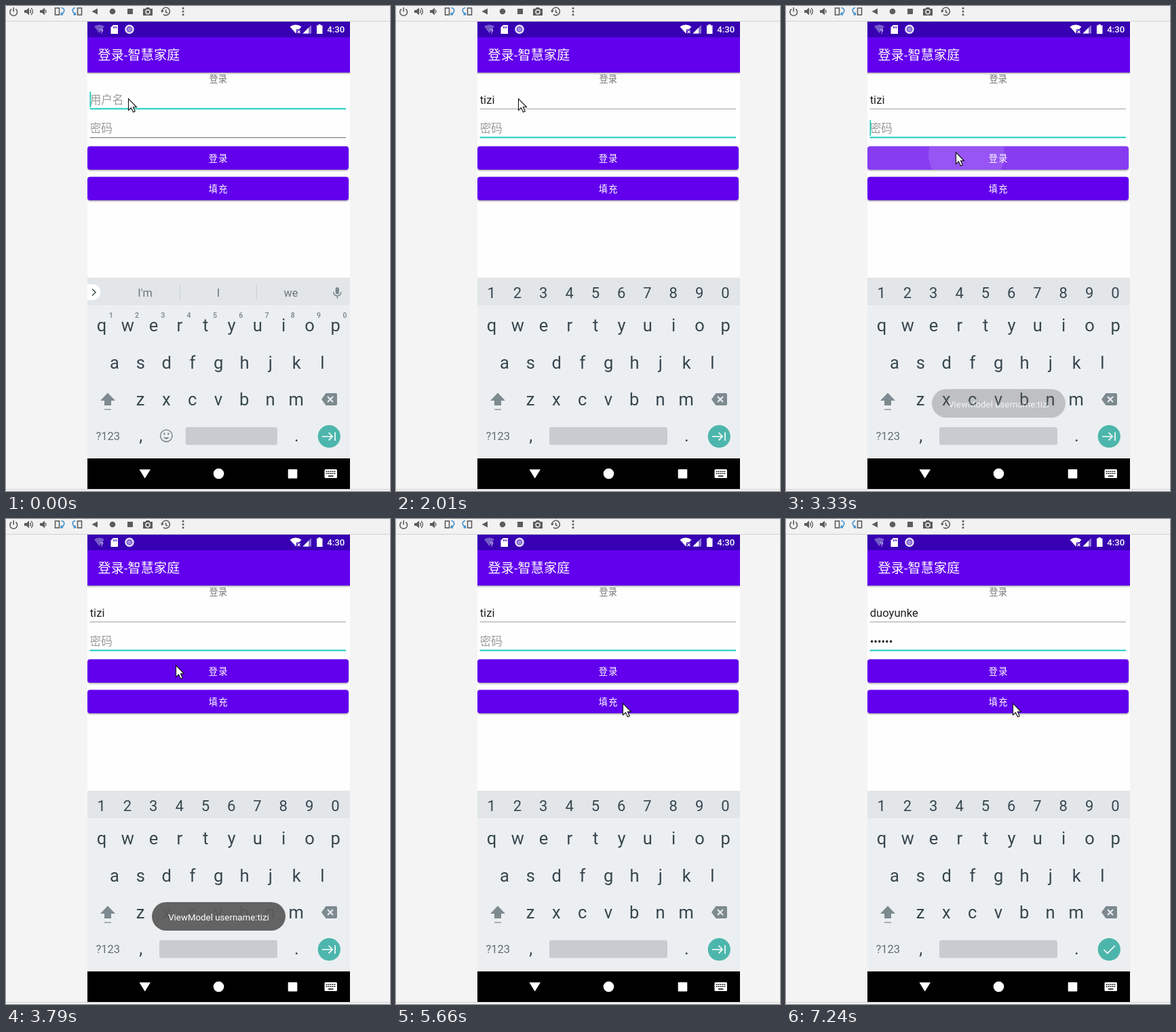
Animation of 566x714 px, one loop 7.32 s. Source, as an HTML page:

```html
<!DOCTYPE html>
<html lang="zh">
<head>
<meta charset="utf-8">
<title>登录</title>
<style>
html, body { margin: 0; width: 100%; height: 100%; overflow: hidden; background: #f4f4f4; }
svg { display: block; width: 566px; height: 714px; }
text { font-family: Roboto, "Noto Sans CJK SC", "Noto Sans CJK", sans-serif; }
.mid { text-anchor: middle; }
.field { font-size: 16.6px; fill: #212121; }
.hint { fill: #9b9b9b; }
.button { font-size: 13.2px; font-weight: 500; letter-spacing: 1.2px; fill: #fff; }
.word { font-size: 16.3px; fill: #69757b; }
.digit { font-size: 22px; fill: #37474f; }
.key { font-size: 25.5px; fill: #37474f; }
.corner { font-size: 10.5px; font-weight: 500; fill: #75828a; }
.grey { fill: #7d8a90; }
.line { fill: none; stroke-width: 1.6; }
</style>
</head>
<body>
<svg viewBox="0 0 566 714" xmlns="http://www.w3.org/2000/svg">
  <defs>
    <clipPath id="clip1"><rect x="120" y="206.5" width="385" height="34.5" rx="4"/></clipPath>
    <clipPath id="clip2"><rect x="120" y="251.5" width="385" height="34.5" rx="4"/></clipPath>
    <clipPath id="screen"><rect x="120" y="23" width="387" height="688"/></clipPath>
    <filter id="shadow" x="-5%" y="-20%" width="110%" height="150%">
      <feDropShadow dx="0" dy="1.3" stdDeviation="1.1" flood-opacity=".38"/>
    </filter>
  </defs>
  <rect width="566" height="714" fill="#f4f4f4"/>
  <rect width="566" height="22" fill="#f2f2f2"/>
  <path d="M0 22.5H566M0 711.5H566" stroke="#d0d0d0"/>

  <!-- emulator tools -->
  <g class="line" stroke="#5c5c5c">
    <path d="M8 4.5A5.4 5.4 0 1 0 14.400 4.500M11.200 2V8.500"/>
    <path d="M35.500 5.500Q37.500 8 35.500 10.500M37 3Q42 8 37 13" stroke-width="1.300"/>
    <path d="M58 5.500Q60 8 58 10.500" stroke-width="1.300"/>
    <rect x="72.500" y="3" width="6" height="10"/>
    <rect x="105.500" y="3" width="6" height="10"/>
    <path d="M230 8.500A5.700 5.700 0 1 1 232 12.300M235.500 5.500V8.800L238 10.200"/>
    <path d="M81.500 2.500Q87 4 85.500 8Q84.500 11 81.500 12.500M84 13L81 12.500 82 9.500M102 2.500Q97 4 98.500 8Q99.500 11 102.500 12.500M99.500 13L102.500 12.500 101.500 9.500" stroke="#3b8fcc"/>
  </g>
  <g fill="#5c5c5c">
    <path d="M27 6H30L34 2.500V13.500L30 10H27ZM50 6H53L57 2.500V13.500L53 10H50ZM135 3.500V12.500L126.500 8ZM179 4H187V12H179ZM202 4H205.500L207 2H211L212.500 4H216V14H202ZM228 6.500H233L230 10Z"/>
    <circle cx="157" cy="8" r="4.300"/>
    <circle cx="209" cy="8.800" r="3" fill="none" stroke="#f2f2f2" stroke-width="1.400"/>
    <circle cx="261" cy="3.300" r="1.500"/><circle cx="261" cy="8" r="1.500"/><circle cx="261" cy="12.700" r="1.500"/>
  </g>

  <!-- app screen -->
  <g clip-path="url(#screen)">
    <rect x="120" y="23" width="387" height="688" fill="#fefefe"/>
    <rect x="110" y="46" width="407" height="52" fill="#6200ee" filter="url(#shadow)"/>
  </g>
  <rect x="120" y="23" width="387" height="23" fill="#3700b3"/>
  <path d="M130 30Q137.500 25 145 30L137.500 40Z" fill="#765bca"/>
  <text x="139" y="41" font-size="9" font-weight="700" fill="#d8cdf2">?</text>
  <path d="M158 28H165V41H154.500V31.500Z" fill="#fff"/>
  <path d="M158.500 30V33M160.700 30V33M162.900 30V33" stroke="#3700b3"/>
  <circle cx="182" cy="34.300" r="6.700" fill="#e9e2f8"/>
  <circle cx="182" cy="34.300" r="3.700" fill="#a18be0" stroke="#6a45c8" stroke-width="1.200"/>
  <path d="M418.500 30.500Q427 24.500 435.500 30.500L432 34.500H428V39L427 40.300Z" fill="#fff"/>
  <path d="M429.500 36L433.500 40M433.500 36L429.500 40" stroke="#fff" stroke-width="1.200"/>
  <path d="M450 28V40.500H437.500Z" fill="#8f76d3"/>
  <path d="M446 32V40.500H437.500Z" fill="#fff"/>
  <path d="M458 28.500H460.500V27H463.700V28.500H466.500V41H458Z" fill="#fff"/>
  <text x="473.300" y="39" font-size="13.200" font-weight="500" fill="#fff">4:30</text>
  <text x="135.500" y="79.300" font-size="19" letter-spacing=".25" fill="#fff">登录-智慧家庭</text>
  <text class="mid" x="312.700" y="112" font-size="13.200" fill="#757575">登录</text>

  <text class="field" id="name" x="123.700" y="144"></text>
  <text class="field" id="secret" x="123.700" y="186.300"></text>
  <rect id="nameLine" x="123.500" width="377.500"/>
  <rect id="secretLine" x="123.500" width="377.500"/>
  <rect id="caret" width="1.700" height="23" fill="#16c9b6"/>

  <g clip-path="url(#screen)">
    <g fill="#6200ee" filter="url(#shadow)">
      <rect x="120" y="206.500" width="385" height="34.500" rx="4"/>
      <rect x="120" y="251.500" width="385" height="34.500" rx="4"/>
    </g>
  </g>
  <g clip-path="url(#clip1)" fill="#fff">
    <rect id="glow1" x="120" y="206" width="385" height="36"/><circle id="spot1"/>
  </g>
  <g clip-path="url(#clip2)" fill="#fff">
    <rect id="glow2" x="120" y="251" width="385" height="36"/><circle id="spot2"/>
  </g>
  <text class="button mid" x="313.200" y="228.500">登录</text>
  <text class="button mid" x="313.200" y="273.700">填充</text>

  <!-- keyboard -->
  <rect x="120" y="400" width="387" height="266" fill="#eceff1"/>
  <rect x="120" y="400" width="387" height="41.500" fill="#e2e6e9"/>
  <path d="M120 441.500H507" stroke="#f3f5f6"/>
  <g id="suggestions">
    <path d="M120 409.500H127.500A11.700 11.700 0 0 1 127.500 433H120Z" fill="#fff"/>
    <path class="line" d="M127 416.500L132 421.500 127 426.500" stroke="#4a555a" stroke-width="1.900"/>
    <path d="M256.500 410V432.500M369.500 410V432.500" stroke="#c9cfd3"/>
    <rect x="485.700" y="414" width="5.200" height="10" rx="2.600" class="grey"/>
    <path class="line" d="M482.800 421Q483 426.500 488.300 426.500T493.800 421M488.300 426.500V430.500" stroke="#7d8a90"/>
  </g>
  <g id="digits"></g>
  <g id="keys"></g>
  <path class="grey" d="M150 569.500L161 581H155V588H145V581H139Z"/>
  <path d="M145 594H155" stroke="#7d8a90" stroke-width="1.300"/>
  <path class="grey" d="M471.500 570H486Q488 570 488 572V586Q488 588 486 588H471.500L465 579Z"/>
  <path d="M474 575L482 583M482 575L474 583" stroke="#eceff1" stroke-width="2"/>
  <text class="mid" x="150.300" y="639" font-size="16.500" fill="#626f75">?123</text>
  <g id="emoji" class="line" stroke="#7d8a90">
    <circle cx="236.300" cy="632.700" r="8.700"/>
    <path d="M231.800 635Q236.300 640.500 240.800 635Z" fill="#7d8a90" stroke="none"/>
    <path d="M233.300 628.500V631.300M239.300 628.500V631.300" stroke-width="2.200"/>
  </g>
  <rect id="space" y="620" height="26.300" rx="3" fill="#c8ccd0"/>
  <circle cx="476.300" cy="633.700" r="16.600" fill="#4db6ac"/>
  <path id="next" class="line" d="M466 633.700H481M475.500 628L481.200 633.700 475.500 639.400M485 627.500V640" stroke="#fff" stroke-width="1.900"/>
  <path id="done" class="line" d="M468.500 634L473.800 639.300 485 628" stroke="#fff" stroke-width="1.900"/>

  <!-- navigation -->
  <rect x="120" y="666" width="387" height="45" fill="#000"/>
  <path d="M196.500 682.300H213L204.700 695.500Z" fill="#fff"/>
  <circle cx="313.500" cy="688.500" r="7.800" fill="#fff"/>
  <rect x="415.700" y="682" width="13.600" height="13.600" rx="1" fill="#fff"/>
  <rect x="469.500" y="682" width="18.500" height="13" rx="1.500" fill="#fff"/>
  <path d="M472 685.300H486M472 688.300H486" stroke="#000" stroke-width="1.600" stroke-dasharray="1.700 1.200"/>
  <path d="M475 692H482.500" stroke="#000" stroke-width="1.500"/>

  <g id="toast">
    <rect x="215" y="564" width="197" height="42" rx="21" fill="#5b5b5b" fill-opacity=".94"/>
    <text class="mid" x="313.500" y="590.500" font-size="13.300" fill="#fff">ViewModel username:tizi</text>
  </g>
  <path id="pointer" d="M0 0V17L4 13.300 7 19.700 9.700 18.500 6.900 12.300H12Z" fill="#fff" stroke="#111" stroke-width="1.100"/>
</svg>
<script>
const LOOP = 7320;
const $ = id => document.getElementById(id);
const set = (id, attrs) => { for (const k in attrs) $(id).setAttribute(k, attrs[k]); };
const show = (id, on) => { $(id).style.display = on ? '' : 'none'; };

function addText(parent, cls, x, y, content) {
  const el = document.createElementNS('http://www.w3.org/2000/svg', 'text');
  el.setAttribute('class', cls + ' mid');
  el.setAttribute('x', x);
  el.setAttribute('y', y);
  el.textContent = content;
  $(parent).append(el);
  return el;
}

const PITCH = 38.3;
const row = (parent, cls, chars, x, y) =>
  [...chars].map((c, i) => addText(parent, cls, x + i * PITCH, y, c));
row('keys', 'key', 'qwertyuiop', 141, 479.3);
row('keys', 'key', 'asdfghjkl', 160, 533.7);
row('keys', 'key', 'zxcvbnm', 198, 588);
row('keys', 'key', ',', 198.7, 640.5);
row('keys', 'key', '.', 428.3, 640.5);
row('digits', 'digit', '1234567890', 140.7, 430);
const corners = row('keys', 'corner', '1234567890', 154.7, 458.5);
const words = [205, 313, 420].map(x => addText('suggestions', 'word', x, 427.7, ''));

const ticks = [
  [0, 0, 1], [460, 460, 1], [630, 780, 3], [1080, 1160, 2], [1540, 1640, 2], [2010, 2010, 1],
  [2570, 3250, 10], [3330, 3330, 1], [3410, 3790, 6], [4340, 4340, 1], [4650, 5180, 8],
  [5260, 5340, 2], [5490, 5980, 7], [6070, 6200, 2], [6760, 6760, 1], [7240, 7240, 1]
].flatMap(([a, b, n]) => Array.from({ length: n }, (_, i) => n > 1 ? a + (b - a) * i / (n - 1) : a));

// Last value whose time has come
const hold = (t, list) => list.filter(e => e[0] <= t).pop()[1];

// Linear interpolation through [time, ...values]
function track(t, keys, ease = x => x) {
  if (t <= keys[0][0]) return keys[0].slice(1);
  const i = keys.findIndex(k => k[0] > t);
  if (i < 0) return keys[keys.length - 1].slice(1);
  const a = keys[i - 1], b = keys[i], p = ease((t - a[0]) / (b[0] - a[0]));
  return a.slice(1).map((v, j) => v + (b[j + 1] - v) * p);
}
const smooth = p => p * p * (3 - 2 * p);

const names = [[0, ''], [630, 't'], [700, 'ti'], [1080, 'tiz'], [1160, 'tizi'], [5800, 'duoyunke']];
const guesses = [[0, ["I'm", 'I', 'we']], [630, ['to', 't', 'the']], [780, ['tie', 'ti', 'time']],
  [1160, ['tiki', 'tizi', 'tiding']]];
const blinks = [0, 460, 630, 2010, 2570, 3000, 3330, 3780, 4340, 4720, 5180, 5640, 5800, 6200, 6760, 7240];
const pointerPath = [[0, 180.5, 136.5], [2570, 180.5, 136.5], [3020, 250.5, 215.5], [4640, 250.5, 215.5],
  [5180, 348.5, 292.5], [5480, 348.5, 292.5], [5650, 334.5, 271.5]];
// time, centre x, radius, glow, spot
const ripple1 = [[3160, 250, 0, 0, 0], [3250, 257, 30, .2, .12], [3330, 266, 56, .235, .125], [3560, 300, 150, .15, .08], [3780, 312, 193, 0, 0]];
const ripple2 = [[5730, 335, 0, 0, 0], [5820, 333, 32, .235, .125], [5980, 327.5, 92.5, .15, .085], [6190, 312, 193, 0, 0]];

function ripple(n, t, keys, cy) {
  const [cx, r, glow, spot] = track(t, keys);
  set('glow' + n, { 'fill-opacity': glow });
  set('spot' + n, { cx, cy, r, 'fill-opacity': spot });
}

function field(id, value, hint) {
  $(id).textContent = value || hint;
  $(id).classList.toggle('hint', !value);
}

function underline(id, y, focused, idle) {
  set(id, focused ? { y: y - .5, height: 2, fill: '#17cdbd' } : { y, height: 1.4, fill: idle });
}

function draw(t) {
  const name = hold(t, names), onSecret = t >= 1540, numeric = t >= 1640;
  field('name', name, '用户名');
  field('secret', t >= 5800 ? '••••••' : '', '密码');
  underline('nameLine', 150.8, !onSecret, '#b5b5b5');
  underline('secretLine', 193, onSecret, '#8c8c8c');

  const typed = !onSecret && name ? $('name').getComputedTextLength() : 0;
  set('caret', { x: 123.5 + typed, y: onSecret ? 168 : 126 });
  show('caret', blinks.filter(b => b <= t).length % 2);

  hold(t, guesses).forEach((w, i) => { words[i].textContent = w; });
  show('suggestions', !numeric);
  show('digits', numeric);
  show('emoji', !numeric);
  corners.forEach(c => { c.style.display = numeric ? 'none' : ''; });
  set('space', numeric ? { x: 226, width: 174 } : { x: 264.7, width: 135.3 });
  show('next', t < 5890);
  show('done', t >= 5890);

  ripple(1, t, ripple1, 217);
  ripple(2, t, ripple2, 270);

  const enter = Math.min(1, Math.max(0, (t - 3240) / 500));
  const leave = Math.min(1, Math.max(0, (t - 4870) / 470));
  set('toast', { opacity: t < 3300 ? 0 : (1 - (1 - enter) ** 2) * (1 - leave ** 2) });

  const [x, y] = track(t, pointerPath, smooth);
  set('pointer', { transform: `translate(${x} ${y})` });
}

const start = performance.now();
function frame() {
  const t = (performance.now() - start) % LOOP;
  draw(ticks.filter(k => k <= t + .01).pop());
  requestAnimationFrame(frame);
}
frame();
</script>
</body>
</html>
```
